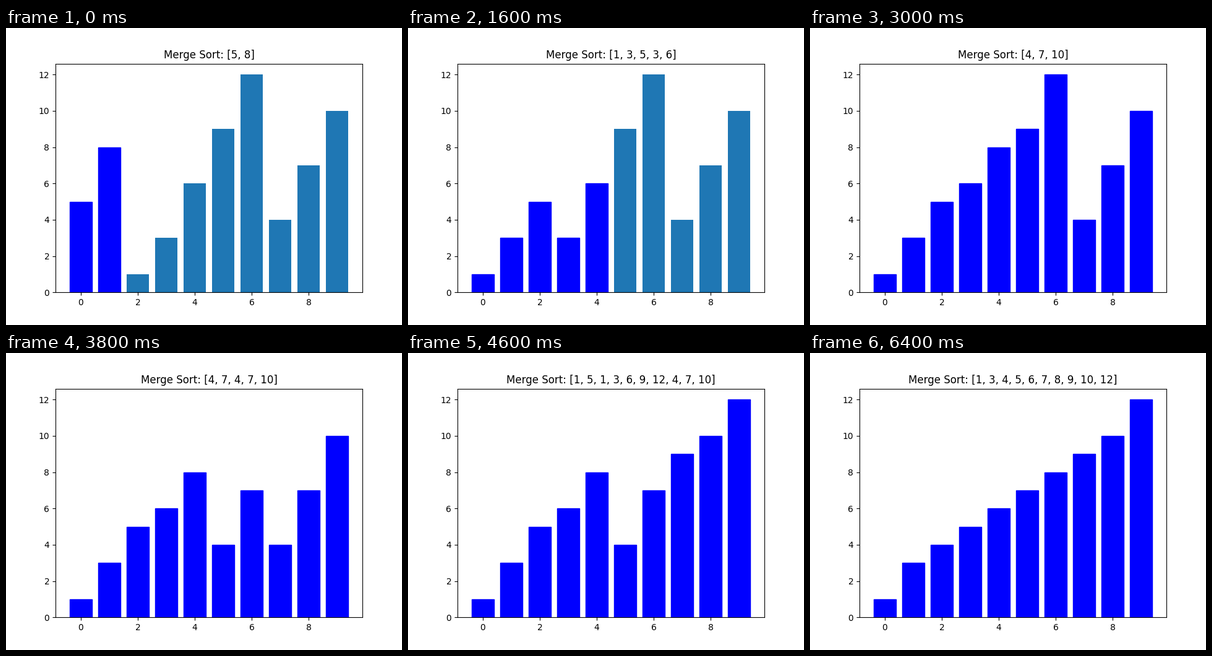
A matplotlib script for the animation above (6600 ms loop, 640 by 480 pixels).

```python
import matplotlib.pyplot as plt
from matplotlib.animation import FuncAnimation

VALUES = [8, 5, 1, 3, 6, 9, 12, 4, 7, 10]
STEP_MS = 200


def merge_sort(arr, start=0):
    """Sort arr in place, yielding (start, position, list) after each write."""
    if len(arr) < 2:
        return
    mid = len(arr) // 2
    left, right = arr[:mid], arr[mid:]
    yield from merge_sort(left, start)
    yield from merge_sort(right, start + mid)
    i = j = 0
    for k in range(len(arr)):
        if j == len(right) or (i < len(left) and left[i] <= right[j]):
            arr[k] = left[i]
            i += 1
        else:
            arr[k] = right[j]
            j += 1
        yield start, k, list(arr)


def build_steps():
    """Collect the bar heights, touched bars and title of every step."""
    heights, touched, steps = list(VALUES), set(), []
    for start, k, part in merge_sort(list(VALUES)):
        heights[start + k] = part[k]
        touched.update(range(start, start + len(part)))
        steps.append((list(heights), set(touched), f"Merge Sort: {part}"))
    return steps[1:]  # the loop opens with the second write


steps = build_steps()

fig, ax = plt.subplots(figsize=(6.4, 4.8), dpi=100)
bars = ax.bar(range(len(VALUES)), VALUES)
title = ax.set_title("")


def update(n):
    heights, touched, text = steps[n]
    for i, (bar, height) in enumerate(zip(bars, heights)):
        bar.set_height(height)
        if i in touched:
            bar.set_color("blue")
        else:
            bar.set_facecolor("C0")
            bar.set_edgecolor("none")
    title.set_text(text)
    return [*bars, title]


anim = FuncAnimation(fig, update, frames=len(steps), interval=STEP_MS,
                     init_func=lambda: update(0), repeat=True)
plt.show()
```
